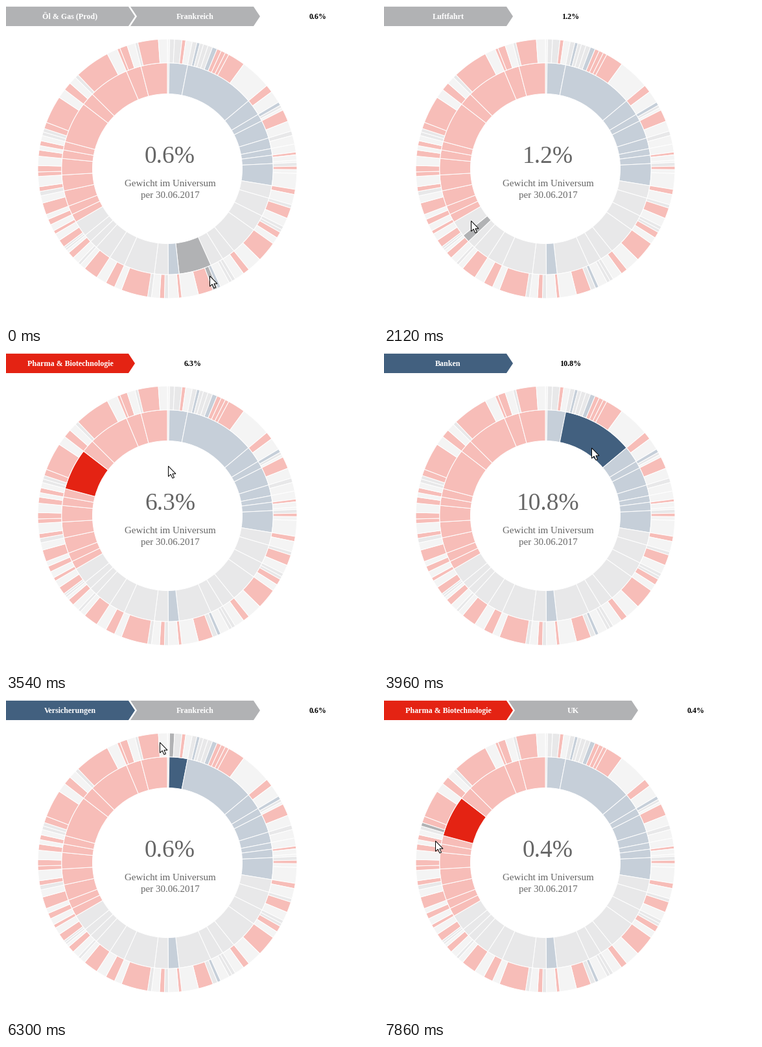
A matplotlib script for the animation above (8 s loop, 574 by 492 pixels).

```python
import numpy as np
import matplotlib.pyplot as plt
from matplotlib.animation import FuncAnimation
from matplotlib.collections import PatchCollection
from matplotlib.colors import to_rgb
from matplotlib.patches import Polygon, Wedge

W, H = 574, 492
INTERVAL, LOOP = 40, 8000
CX, CY = 249, 251
R_HOLE, R_MID, R_OUT = (200 * np.sqrt(k / 3) for k in (1, 2, 3))
LAG = 125  # the highlight trails the pointer by this many ms

RED, BLUE, GREY, REST = "#e42313", "#42607f", "#b1b2b4", "#d9dadb"
COUNTRIES = {
    RED: ["Schweiz", "Japan", "Kanada"],
    BLUE: ["Russland", "China", "Brasilien"],
    GREY: ["Frankreich", "UK", "Hongkong", "Australien", "Spanien"],
}
REST_LABEL = "31 Länder mit Gew. < 0.35%"

# sector name, colour, end angle, (colour, end angle) of each listed country
SECTORS = [
    ("Diverse", GREY, 1.0, []),
    ("Versicherungen", BLUE, 11.1, [(GREY, 3.2), (GREY, 6.5), (RED, 8.2)]),
    ("Banken", BLUE, 50.1, [(GREY, 13.2), (BLUE, 14.6), (GREY, 16.2), (GREY, 18.3),
                            (GREY, 20.4), (BLUE, 22.6), (RED, 24.6), (RED, 26.6),
                            (RED, 28.3), (RED, 36.2)]),
    ("Finanzdienste", BLUE, 59.1, [(RED, 53.6)]),
    ("Bergbau", BLUE, 63.1, [(BLUE, 60.7), (GREY, 61.9)]),
    ("Immobilien", BLUE, 73.1, [(RED, 68.5)]),
    ("Baustoffe", BLUE, 79.0, [(GREY, 75.1)]),
    ("Stahl", BLUE, 82.6, []),
    ("Papier", BLUE, 87.2, [(RED, 83.8), (REST, 86.2)]),
    ("Telekom", BLUE, 99.2, [(GREY, 88.9), (RED, 90.4), (REST, 92.1)]),
    ("Reisen & Freizeit", GREY, 106.2, [(RED, 101.5)]),
    ("Lebensmittel", GREY, 116.5, [(GREY, 107.7), (RED, 112.5)]),
    ("Getränke", GREY, 125.3, [(GREY, 118), (GREY, 119.4), (RED, 122.2)]),
    ("Handel", GREY, 141.0, [(RED, 134.5)]),
    ("Transport", GREY, 148.4, [(RED, 144)]),
    ("Automobile", GREY, 155.7, [(GREY, 150), (GREY, 151.5)]),
    ("Öl & Gas (Prod)", GREY, 173.6, [(BLUE, 157.2), (GREY, 159.4), (RED, 166.1)]),
    ("Öl & Gas (Service)", BLUE, 179.5, [(RED, 175)]),
    ("Chemie", GREY, 187.1, [(GREY, 181.3), (RED, 183.5)]),
    ("Technologie", GREY, 204.1, [(GREY, 188.8), (RED, 200.8)]),
    ("Maschinenbau", GREY, 213.0, [(RED, 208.4)]),
    ("Elektronik & Geräte", GREY, 222.2, [(RED, 219.7)]),
    ("Versorger", GREY, 226.6, [(GREY, 223.5)]),
    ("Luftfahrt", GREY, 231.0, [(RED, 229.6)]),
    ("Haushaltsgüter", GREY, 239.8, [(GREY, 232), (GREY, 233), (RED, 236.5)]),
    ("Tabak", RED, 244.4, [(RED, 241.4)]),
    ("Körperpflege", RED, 249.3, [(RED, 247)]),
    ("Medien", RED, 257.9, [(RED, 254.6)]),
    ("Textilien", RED, 266.6, [(GREY, 259.9), (RED, 262)]),
    ("Halbleiter", RED, 275.6, [(RED, 268.6), (RED, 271.4)]),
    ("Hardware", RED, 280.3, [(RED, 278.3)]),
    ("Medizinaltechnik", RED, 284.9, [(RED, 282.5)]),
    ("Pharma & Biotechnologie", RED, 307.6, [(GREY, 286.5), (GREY, 288.1),
                                             (RED, 291), (RED, 303.4)]),
    ("Gesundheitsdienste", RED, 314.8, [(RED, 311.3)]),
    ("IT-Services & Software", RED, 337.2, [(GREY, 316.4), (RED, 332.4)]),
    ("Internet", RED, 345.5, [(RED, 338.5), (RED, 341.9)]),
    ("Konsumgüter", RED, 360.0, [(GREY, 346.8), (RED, 356)]),
]

# pointer path: time, clockwise angle from the top, radius
PATH = np.array([
    (-200, 156.5, 179), (0, 158.5, 177.3), (380, 170, 164), (1140, 201.1, 155.4),
    (2145, 236, 140), (2270, 243, 138), (2930, 300.5, 124.2), (3390, 345, 55),
    (3825, 390, 118), (3960, 394.1, 126.7), (4110, 395, 133), (4390, 400, 168),
    (4810, 404, 174), (5210, 401, 178), (5350, 394.5, 179), (5490, 393.2, 179.2),
    (5630, 386, 183), (5790, 384, 184), (6680, 335, 188), (6810, 331, 192),
    (6930, 327, 186), (7735, 287.2, 176), (7860, 281.3, 173.4),
])
# first time, last time and count of each run of screen updates
RUNS = [(0, 0, 1), (150, 1140, 8), (1260, 2270, 8), (2390, 2930, 5), (3080, 3390, 3),
        (3540, 3960, 4), (4110, 4110, 1), (4520, 4810, 3), (5210, 5490, 3),
        (5630, 5630, 1), (5910, 6810, 8), (6930, 7860, 8)]
STEPS = np.concatenate([np.linspace(*run) for run in RUNS])


class Node:
    def __init__(self, name, color, start, end, parent=None):
        self.name, self.color, self.parent = name, color, parent
        self.start, self.end = start, end
        self.weight = f"{(end - start) / 3.6:.1f}%"
        self.radii = (R_MID, R_OUT) if parent else (R_HOLE, R_MID)

    def trail(self):
        return [self.parent, self] if self.parent else [self]

    def contains(self, angle, radius):
        return (self.start <= angle < self.end
                and self.radii[0] <= radius < self.radii[1])

    def wedge(self):
        inner, outer = self.radii
        return Wedge((CX, CY), outer, self.start - 90, self.end - 90, width=outer - inner)


def build_nodes():
    nodes, start = [], 0
    for name, color, end, children in SECTORS:
        sector = Node(name, color, start, end)
        nodes.append(sector)
        seen = {RED: 0, BLUE: 0, GREY: 0}
        for i, (tint, stop) in enumerate(children + [(REST, end)]):
            if tint == REST:
                label = REST_LABEL
            elif tint == RED and i == len(children) - 1:
                label = "USA"
            else:
                label = COUNTRIES[tint][seen[tint] % len(COUNTRIES[tint])]
                seen[tint] += 1
            nodes.append(Node(label, tint, start, stop, sector))
            start = stop
    return nodes


def pointer(t):
    return [np.interp(t, PATH[:, 0], PATH[:, k]) for k in (1, 2)]


def build_states(nodes):
    states, active = [], None
    for t in STEPS:
        angle, radius = pointer(t - LAG)
        hit = [n for n in nodes if n.contains(angle % 360, radius)]
        active = hit[0] if hit else active  # the hole keeps the last selection
        angle, radius = pointer(t)
        a = np.radians(angle)
        tip = np.round([CX + radius * np.sin(a), CY - radius * np.cos(a)])
        states.append((active, tip))
    return states


def faded(color):
    return tuple(1 - 0.3 * (1 - c) for c in to_rgb(color))


nodes = build_nodes()
states = build_states(nodes)

fig = plt.figure(figsize=(W / 72, H / 72), dpi=72, facecolor="white")
ax = fig.add_axes([0, 0, 1, 1])
ax.set(xlim=(0, W), ylim=(H, 0))
ax.axis("off")


def text(x, y, size, color, content="", weight="normal"):
    return ax.text(x, y, content, size=size, color=color, weight=weight, ha="center",
                   va="baseline", family="Liberation Serif", parse_math=False)


rings = PatchCollection([n.wedge() for n in nodes], edgecolor="white", linewidth=1)
ax.add_collection(rings)

crumbs = []
for x, notch in ((-1, 0), (192, 10)):
    shape = Polygon([(x, 1), (x + 190, 1), (x + 200, 16), (x + 190, 31), (x, 31),
                     (x + notch, 16)], linewidth=0)
    ax.add_patch(shape)
    crumbs.append((shape, text(x + 100, 20.2, 12, "white", weight="bold")))
trail_weight = text(0, 20.2, 12, "black", weight="bold")

number = text(253, 242, 37.5, "#666666")
text(253, 278, 15, "#666666", "Gewicht im Universum")
text(253, 296, 15, "#666666", "per 30.06.2017")

ARROW = np.array([(0, 0), (0, 16), (3.7, 12.6), (6.4, 18.6), (9, 17.5), (6.4, 11.8),
                  (11.5, 11.8)])
arrow = Polygon(ARROW, facecolor="white", edgecolor="black", linewidth=1, zorder=5)
ax.add_patch(arrow)


def draw(frame):
    t = frame * INTERVAL + INTERVAL / 2
    active, tip = states[np.searchsorted(STEPS, t, side="right") - 1]
    trail = active.trail()
    rings.set_facecolor([to_rgb(n.color) if n in trail else faded(n.color)
                         for n in nodes])
    for i, (shape, label) in enumerate(crumbs):
        shown = i < len(trail)
        shape.set_visible(shown)
        label.set_visible(shown)
        if shown:
            shape.set_facecolor(trail[i].color)
            label.set_text(trail[i].name)
    trail_weight.set_x((len(trail) + 0.5) * 193 - 1)
    trail_weight.set_text(active.weight)
    number.set_text(active.weight)
    arrow.set_xy(ARROW + tip + 0.5)
    return []


anim = FuncAnimation(fig, draw, frames=LOOP // INTERVAL, interval=INTERVAL,
                     repeat=True, repeat_delay=0)
plt.show()
```
